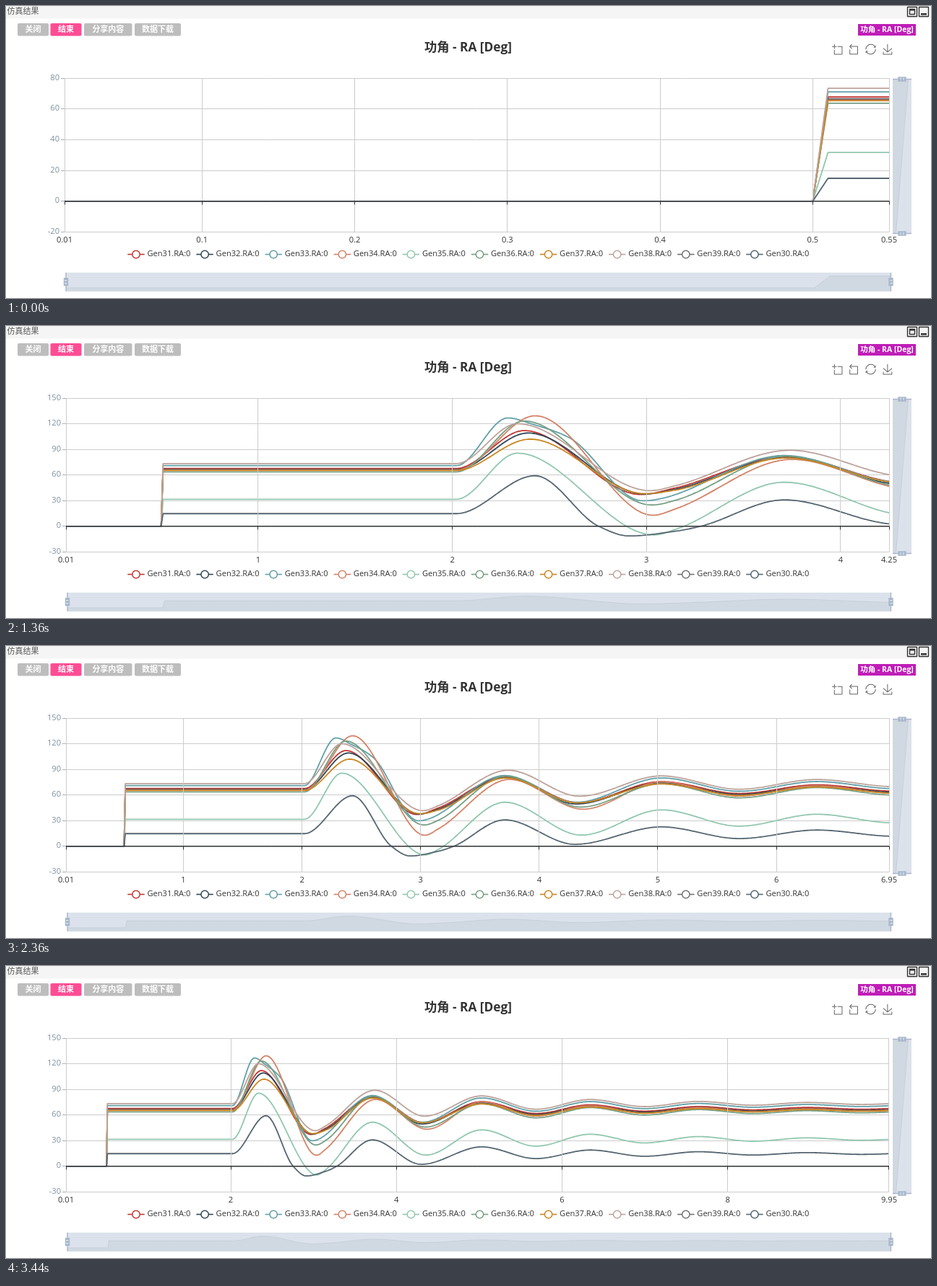
An HTML page with a canvas that plays this animation: 1280x405 px, repeating every 3.51 s.

```html
<!DOCTYPE html>
<html lang="zh">
<head>
<meta charset="utf-8">
<title>仿真结果</title>
<style>
html, body { margin: 0; width: 1280px; height: 405px; overflow: hidden; background: #fff; }
canvas { display: block; }
</style>
</head>
<body>
<canvas id="stage" width="1280" height="405"></canvas>
<script>
const g = document.getElementById('stage').getContext('2d');
const FONT = '"Open Sans", "Noto Sans CJK SC", "Noto Sans CJK", sans-serif';
const TOP = 100, BOTTOM = 313.5, RIGHT = 1222, LOOP = 3510;

// name, colour, steady value, tail swing, then (time, value) points of the first swings
const series = [
  ['Gen31', '#c23531', 67.7, 8, [2.37, 112, 2.97, 37.3, 3.15, 45, 3.72, 81.5, 4.33, 51.2]],
  ['Gen32', '#2f4554', 66.4, 7.8, [2.39, 109.2, 2.99, 37.8, 3.15, 43.5, 3.72, 80.5, 4.31, 49.6]],
  ['Gen33', '#61a0a8', 71, 9, [2.286, 126.8, 2.42, 119, 2.6, 104, 2.98, 30, 3.71, 82.8, 4.31, 51.6]],
  ['Gen34', '#d48265', 65.8, 9.6, [2.427, 129.3, 3.035, 13, 3.15, 20.5, 3.75, 78.3, 4.37, 43.5]],
  ['Gen35', '#91c7ae', 31.7, 11, [2.335, 85.6, 3.04, -10, 3.15, -3.5, 3.71, 51.6, 4.355, 13.2]],
  ['Gen36', '#749f83', 63.7, 9.5, [2.37, 123.2, 3.03, 25, 3.15, 30.6, 3.72, 82, 4.35, 46]],
  ['Gen37', '#ca8622', 65.3, 7.7, [2.4, 102, 2.99, 38.3, 3.15, 42.5, 3.72, 80, 4.32, 51]],
  ['Gen38', '#bda29a', 73.4, 9, [2.335, 120, 3.02, 41.8, 3.15, 47.6, 3.74, 89, 4.34, 58.7]],
  ['Gen39', '#6e7074', 0, 0, []],
  ['Gen30', '#546570', 14.9, 7.9, [2.426, 59.2, 2.755, 0, 2.91, -11.2, 3.15, -5.6, 3.28, 0.2, 3.71, 31, 4.3, 2.4]],
].map(([name, color, base, swing, flat]) => ({ name, color, values: sample(base, swing, flat) }));

function sample(base, swing, flat) {
  const pts = [[0.51, base], [2.02, base]];
  for (let i = 0; i < flat.length; i += 2) pts.push([flat[i], flat[i + 1]]);
  for (let i = 0; i < 10; i++) pts.push([5.03 + 0.655 * i, base + swing * (-0.73) ** i]);
  const curve = monotone(pts);
  return Array.from({ length: 995 }, (_, i) => i < 50 ? 0 : curve((i + 1) / 100));
}

function monotone(p) {
  const slope = i => (p[i + 1][1] - p[i][1]) / (p[i + 1][0] - p[i][0]);
  const tangent = p.map((_, i) => {
    if (!i || i === p.length - 1) return 0;
    const a = slope(i - 1), b = slope(i);
    return a * b <= 0 ? 0 : 2 * a * b / (a + b);
  });
  return t => {
    let i = 0;
    while (i < p.length - 2 && t > p[i + 1][0]) i++;
    const h = p[i + 1][0] - p[i][0], u = (t - p[i][0]) / h, w = 1 - u;
    return p[i][1] * w * w * (1 + 2 * u) + p[i + 1][1] * u * u * (3 - 2 * u)
      + h * u * w * (tangent[i] * w - tangent[i + 1] * u);
  };
}

function niceStep(raw) {
  const unit = 10 ** Math.floor(Math.log10(raw)), f = raw / unit;
  return unit * (f < 1.5 ? 1 : f < 2.5 ? 2 : f < 4 ? 3 : f < 7 ? 5 : 10);
}

function text(s, x, y, color, align = 'left', size = 11.1, weight = 400) {
  g.font = `${weight} ${size}px ${FONT}`;
  g.fillStyle = color;
  g.textAlign = align;
  g.textBaseline = 'middle';
  g.fillText(s, x, y);
}

function line(points, color, width = 1) {
  g.beginPath();
  points.forEach(([x, y]) => g.lineTo(x, y));
  g.strokeStyle = color;
  g.lineWidth = width;
  g.stroke();
}

function box(x, y, w, h, color, r = 0) {
  g.fillStyle = color;
  g.beginPath();
  g.roundRect(x, y, w, h, r);
  g.fill();
}

const crisp = v => Math.floor(v) + 0.5;
const rule = (x1, y1, x2, y2, color) => line([[x1, y1], [x2, y2]], color);

const tools = [
  [1150, 29, 29, 'M0,13.5h26.9M13.5,26.9V0M32.1,13.5H58V58H13.5V32.1'],
  [1173, 32.4, 29.7, 'M22,1.4L9.9,13.5l12.3,12.3M10.3,13.5H54.9v44.6H10.3v-26'],
  [1196.5, 29.5, 30, 'M47,18.9h9.8V8.7M56.3,20.1C52.1,9,40.5,.6,26.8,2.1C12.6,3.7,1.6,16.2,2.1,30.6M13,41.1H3.1v10.2M3.7,39.9c4.2,11.1,15.8,19.5,29.5,18c14.2-1.6,25.2-14.1,24.7-28.5'],
  [1220, 29.7, 29, 'M4.7,22.9L29.3,45.5L54.7,23.4M4.6,43.6V58H53.8V43.6M29.2,45.1V0'],
].map(([x, cx, cy, d]) => ({ x, cx, cy, path: new Path2D(d) }));

function header() {
  box(0, 0, 1280, 17.5, '#f5f5f5');
  text('仿真结果', 1.5, 8, '#555', 'left', 11);
  g.strokeStyle = '#333';
  g.lineWidth = 1.4;
  g.strokeRect(1247.5, 1.5, 13, 13);
  g.strokeRect(1263.5, 1.5, 13, 13);
  g.strokeRect(1250.5, 4.5, 7, 7);
  box(1250, 4, 8, 2.5, '#333');
  box(1266, 10, 8, 2.5, '#333');
  [['关闭', 16, 43], ['结束', 61.5, 43], ['分享内容', 108, 66.5], ['数据下载', 178, 64]].forEach(([s, x, w], i) => {
    box(x, 24, w, 17.5, i === 1 ? '#ff4c93' : '#bdbdbd', 2);
    text(s, x + w / 2, 33, '#fff', 'center', 11, 700);
  });
  box(1179, 25, 80, 16, '#c01db8');
  text('功角 - RA [Deg]', 1219, 33, '#fff', 'center', 10.5, 700);
  text('功角 - RA [Deg]', 639.5, 58, '#333', 'center', 17.3, 700);
  for (const { x, cx, cy, path } of tools) {
    g.save();
    g.translate(x, 60);
    g.scale(0.24, 0.24);
    g.translate(-cx, -cy);
    g.strokeStyle = '#666';
    g.lineWidth = 4.2;
    g.stroke(path);
    g.restore();
  }
}

function legend() {
  series.forEach(({ name, color }, i) => {
    const x = 180 + 95.1 * i;
    line([[x - 11.7, 344.5], [x + 11.7, 344.5]], color, 1.6);
    g.beginPath();
    g.arc(x, 344.5, 5.2, 0, 7);
    g.fillStyle = '#fff';
    g.fill();
    g.lineWidth = 1.5;
    g.stroke();
    text(name + '.RA:0', x + 15.5, 344.5, '#333');
  });
}

const grip = new Path2D('M8.2,13.6V3.9H6.3v9.7H3.1v14.9h3.3v9.7h1.8v-9.7h3.3V13.6H8.2zM9.7,24.4H4.8v-1.4h4.9V24.4zM9.7,19.1H4.8v-1.4h4.9V19.1z');
function handle(x, y, angle) {
  g.save();
  g.translate(x, y);
  g.rotate(angle);
  g.scale(0.76, 0.76);
  g.translate(-7.3, -21.05);
  g.fillStyle = '#a7b7cc';
  g.fill(grip, 'evenodd');
  g.restore();
}

function shadow(outline, corners) {
  g.beginPath();
  [...outline, ...corners].forEach(([x, y]) => g.lineTo(x, y));
  g.fillStyle = '#d0d8e1';
  g.fill();
  line(outline, '#bcc7d2', 0.6);
}

function sliders(left, count) {
  const x0 = left + 2, x1 = 1224.5, y1 = 395.7, h = 26;
  const shown = series[0].values.slice(0, count), top = Math.max(...shown);
  box(x0, y1 - h, x1 - x0, h, '#dce2eb');
  shadow(shown.map((v, i) => [x0 + (x1 - x0) * i / (count - 1), y1 - h * (v / top + 0.3) / 1.6]), [[x1, y1], [x0, y1]]);
  handle(x0, y1 - h / 2, 0);
  handle(x1, y1 - h / 2, 0);
  box(1227, 101.5, 26, 214, '#dce2eb');
  shadow([[1248.5, 101.5], [1231.5, 315.5]], [[1227, 315.5], [1227, 101.5]]);
  handle(1240, 101.5, Math.PI / 2);
  handle(1240, 315.5, Math.PI / 2);
}

function chart(end) {
  const count = Math.round(end * 100);
  let lo = 0, hi = 0;
  for (const { values } of series)
    for (let i = 0; i < count; i++) {
      lo = Math.min(lo, values[i]);
      hi = Math.max(hi, values[i]);
    }
  const pad = (hi - lo) * 0.05, yStep = niceStep((hi - lo + 2 * pad) / 5);
  const yMin = Math.floor((lo - pad) / yStep) * yStep, yMax = Math.ceil((hi + pad) / yStep) * yStep;
  const left = yMax >= 100 ? 83 : 81;
  const X = t => left + (t - 0.01) / (end - 0.01) * (RIGHT - left);
  const Y = v => BOTTOM - (v - yMin) / (yMax - yMin) * (BOTTOM - TOP);

  for (let v = yMin; v <= yMax; v += yStep) {
    const y = crisp(Y(v));
    rule(left, y, RIGHT, y, '#ccc');
    rule(left - 5, y, left, y, '#a5b1ba');
    text(String(v), left - 7, y - 0.5, '#7c919e', 'right');
  }

  g.lineJoin = 'bevel';
  for (const { color, values } of series)
    line(values.slice(0, count).map((v, i) => [X((i + 1) / 100), Y(v)]), color, 1.8);

  const step = niceStep((end - 0.01) / 5), ticks = [0.01];
  for (let k = 1; k * step < end; k++) ticks.push(+(k * step).toFixed(2));
  ticks.push(+end.toFixed(2));
  const zero = crisp(Y(0)), last = ticks.length - 1;
  g.font = `11.1px ${FONT}`;
  const width = i => g.measureText(ticks[i]).width;
  const crowded = X(end) - X(ticks[last - 1]) < (width(last) + width(last - 1)) / 2;
  ticks.forEach((t, i) => {
    const x = crisp(X(t));
    rule(x, TOP, x, BOTTOM, '#ccc');
    rule(x, zero, x, zero + 5, '#333');
    if (i < last || !crowded) text(String(t), X(t), 325, '#333', 'center');
  });
  rule(left, zero, RIGHT, zero, '#333');
  sliders(left, count);
}

function draw() {
  const tick = Math.min(86, Math.floor(performance.now() % LOOP / 40));
  g.clearRect(0, 0, 1280, 405);
  header();
  chart(0.55 + 0.1 * Math.floor(tick * 94 / 86 + 0.2));
  legend();
  requestAnimationFrame(draw);
}
draw();
</script>
</body>
</html>
```
